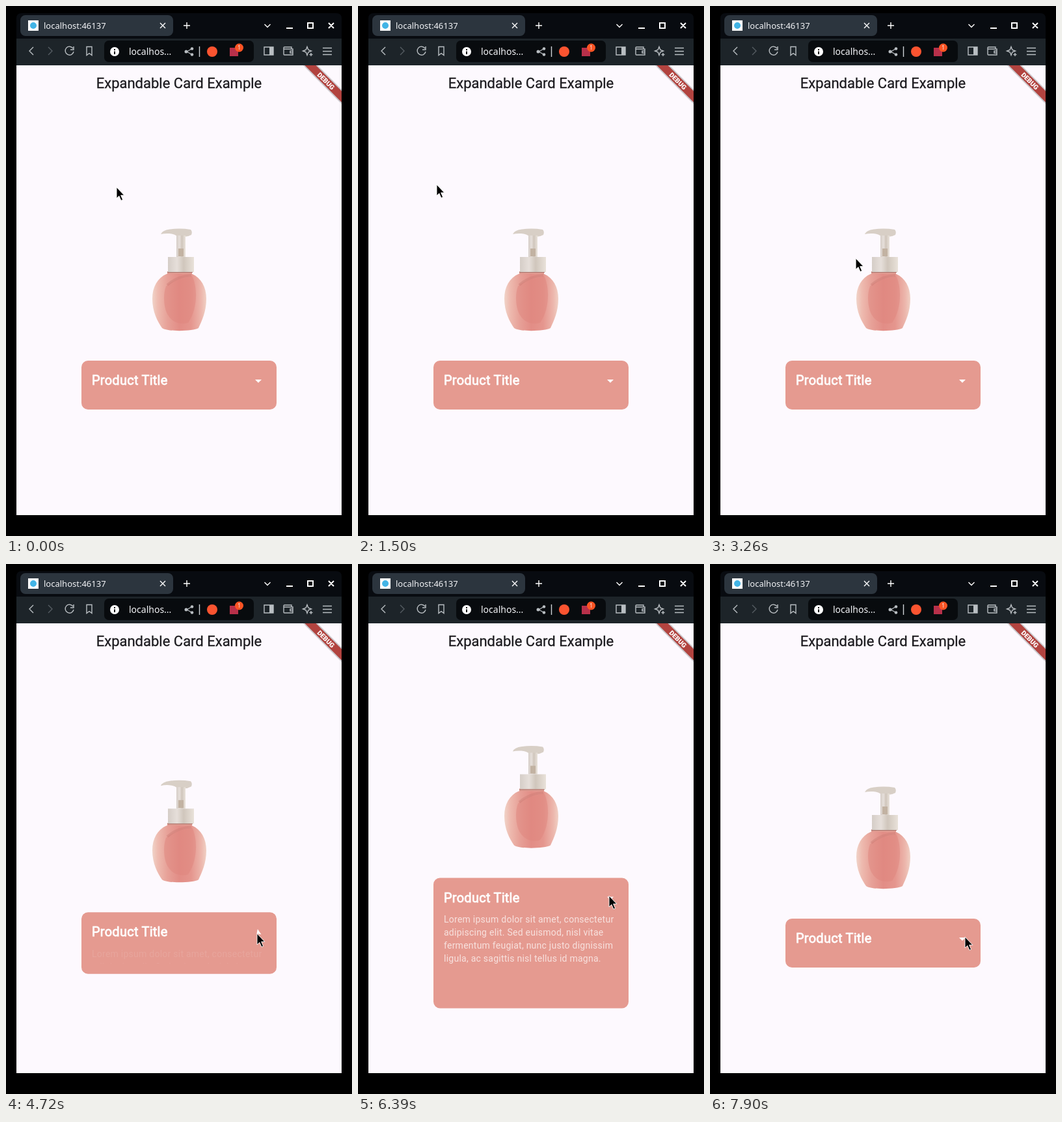
An HTML page that plays this animation: 532x813 px, repeating every 8 s.

```html
<!DOCTYPE html>
<html lang="en">
<head>
<meta charset="utf-8">
<title>Expandable Card Example</title>
<style>
  html, body { margin: 0; width: 100%; height: 100%; overflow: hidden; background: #000; }
  svg { display: block; width: 100%; height: 100%; }
  text { font-family: Roboto, sans-serif; white-space: pre; }
  .ui { font-family: "Noto Sans", sans-serif; fill: #f4f5f8; }
  .icon { fill: none; stroke: #b9bec2; stroke-width: 1.4; }
  .bright { stroke: #fff; stroke-width: 2; }
  .body { font-size: 14px; letter-spacing: .25px; fill: #fff; }
  .name { font-size: 20px; letter-spacing: .25px; fill: #fff; stroke: #fff; stroke-width: .8; }
</style>
</head>
<body>
<svg viewBox="0 0 532 813">
  <defs>
    <linearGradient id="glass">
      <stop stop-color="#f0d3c8"/><stop offset=".1" stop-color="#eebbb0"/>
      <stop offset=".28" stop-color="#e7a198"/><stop offset=".5" stop-color="#e28d86"/>
      <stop offset=".72" stop-color="#e5968e"/><stop offset=".9" stop-color="#ecb5ab"/>
      <stop offset="1" stop-color="#f0d0c4"/>
    </linearGradient>
    <linearGradient id="metal">
      <stop stop-color="#d5cdc7"/><stop offset=".35" stop-color="#e6dfda"/>
      <stop offset=".6" stop-color="#d0c6bc"/><stop offset="1" stop-color="#e9e2da"/>
    </linearGradient>
    <filter id="soft"><feGaussianBlur stdDeviation="3"/></filter>
    <filter id="edge"><feGaussianBlur stdDeviation=".6"/></filter>
    <clipPath id="page"><path d="M16 91h500v690H16z"/></clipPath>
    <clipPath id="room"><rect id="roomBox" x="116" width="300"/></clipPath>
  </defs>

  <!-- window -->
  <rect width="532" height="813"/>
  <path d="M16 91V19q0-8 8-8h484q8 0 8 8v72z" fill="#080b10"/>
  <path d="M16 50h500v41H16z" fill="#1d2429"/>
  <rect x="22" y="14" width="235" height="32" rx="8" fill="#2c353e"/>
  <path d="M34 22h16v16H34z" fill="#fff"/>
  <circle cx="42" cy="30" r="5" fill="#42b4e6"/>
  <text class="ui" x="58" y="35" font-size="13">localhost:46137</text>
  <g class="icon bright">
    <path d="M237 26l8 8m0-8l-8 8M273 30h10m-5-5v10" stroke-width="1.4"/>
    <path d="M397.500 28l4.500 4.500 4.500-4.500" stroke-width="1.4"/>
    <path d="M431 34h10M464 26h8v8h-8zM496 26l8 8m0-8l-8 8"/>
  </g>

  <!-- toolbar -->
  <rect x="151" y="53" width="230" height="33" rx="7" fill="#080b0e"/>
  <g class="icon">
    <path d="M42 63l-6 6 6 6M103 65a6.500 6.500 0 1 0 1 5M104 62v5h-5M124 62.500h8v13l-4-3-4 3z"/>
    <path d="M65 63l6 6-6 6" stroke="#555c62"/>
    <path d="M278 70l7-4m-7 4l7 4"/>
    <g fill="#b9bec2" stroke="none">
      <circle cx="277" cy="70" r="2.500"/><circle cx="286" cy="65.500" r="2.300"/><circle cx="286" cy="74.500" r="2.300"/>
      <path d="M405 63h6v12h-6z"/>
    </g>
    <path d="M297.500 62v16" stroke="#d0d4d8"/>
    <path d="M397 63h14v12h-14z"/>
    <path d="M427 66v-2q0-1 1-1h11v3m-12 0h14v9h-13q-1 0-1-1zM441 69h-4v3h4"/>
    <path d="M463 62.500l1.800 4.700 4.700 1.800-4.700 1.800-1.800 4.700-1.800-4.700-4.700-1.800 4.700-1.800zM469 72v5m-2.500-2.500h5"/>
    <path d="M487 64.500h14m-14 5h14m-14 5h14"/>
  </g>
  <circle cx="167" cy="70" r="7" fill="#fff"/>
  <path d="M167 66v2m0 1.500v4.500" stroke="#111" stroke-width="2"/>
  <text class="ui" x="189" y="75" font-size="14">localhos...</text>
  <circle cx="317" cy="70" r="8" fill="#fb5430"/>
  <path d="M344 64h13v13h-13z" fill="#b8304a"/>
  <circle cx="358.500" cy="64" r="6.500" fill="#fb5424"/>
  <text class="ui" x="358.500" y="67" font-size="8" text-anchor="middle">1</text>

  <!-- page -->
  <path d="M16 91h500v690H16z" fill="#fdf9fe"/>
  <text x="266" y="126" font-size="22" text-anchor="middle" fill="#1c1b1f" stroke="#1c1b1f" stroke-width=".3">Expandable Card Example</text>
  <g clip-path="url(#page)">
    <g transform="translate(516 91) rotate(45)">
      <path d="M-44 28h88v12h-88z" opacity=".5" filter="url(#soft)"/>
      <path d="M-40 28h80v12h-80z" fill="#b2433f"/>
      <text y="37.700" font-size="10.200" font-weight="900" text-anchor="middle" fill="#fff">DEBUG</text>
    </g>
  </g>

  <!-- everything here rises while the card grows -->
  <g id="product">
    <g filter="url(#edge)">
      <path d="M238 350q2-6 14-7.500 16-2 32 .5 3 3 1 8-5 3-11 3h-10q-4-4-13-5-7-.5-13 1z" fill="#d8cfc6"/>
      <path d="M262 352h14v33h-14z" fill="url(#metal)"/>
      <path d="M265 372h8v12h-8z" fill="#c2b2a2"/>
      <path d="M248 407h38v7h-38z" fill="#df9a90"/>
      <path d="M247 411h39c14 6 22 20 22 38 0 20-7 34-12 45-8 5-48 6-56 0-7-10-15-25-15-45 0-18 8-32 22-38z" fill="url(#glass)"/>
      <path d="M246 430c8-10 30-12 40-16 8 14 10 50-6 72-14 4-28-2-34-18-4-12-4-28 0-38z" fill="#e0857f" opacity=".5"/>
      <path d="M248 428q14-13 37-15" fill="none" stroke="#c97870" stroke-width="4" opacity=".4"/>
      <path d="M249 385h40v23h-40z" fill="url(#metal)"/>
      <path d="M248 408.500h39" stroke="#a8746c"/>
    </g>
    <rect id="card" x="116" y="544" width="300" rx="10" fill="#e59a90"/>
    <text class="name" x="132" y="581">Product Title</text>
    <path id="arrow" d="M-5-2h10l-5 5z" fill="#fff"/>
    <g id="copy" class="body" clip-path="url(#room)">
      <text x="132" y="612.500">Lorem ipsum dolor sit amet, consectetur</text>
      <text x="132" y="632.500">adipiscing elit. Sed euismod, nisl vitae</text>
      <text x="132" y="652.500">fermentum feugiat, nunc justo dignissim</text>
      <text x="132" y="672.500">ligula, ac sagittis nisl tellus id magna.</text>
    </g>
  </g>
  <path id="cursor" d="M0 0v17l3.900-3.600 3 7 2.700-1.200-3-6.800h5.200z" stroke="#fff" stroke-width=".9"/>
</svg>
<script>
  const LOOP = 8000, CLOSED = 75, OPEN = 200, TURN = 730;
  const $ = id => document.getElementById(id);
  const set = (id, attrs) => {
    for (const k in attrs) $(id).setAttribute(k, attrs[k]);
  };
  const ramp = (t, from, to) => Math.min(1, Math.max(0, (t - from) / (to - from)));

  // cubic-bezier(.25, .1, .25, 1), solved by bisection
  function ease(x) {
    const bezier = (u, a, b) => 3 * a * u * (1 - u) ** 2 + 3 * b * u * u * (1 - u) + u ** 3;
    let low = 0, high = 1;
    for (let i = 0; i < 20; i++) {
      const mid = (low + high) / 2;
      if (bezier(mid, .25, .25) < x) low = mid; else high = mid;
    }
    return x <= 0 ? 0 : x >= 1 ? 1 : bezier(low, .1, 1);
  }

  // time, x, y
  const path = [
    [80, 170, 278], [830, 146, 276], [930, 146, 276], [1500, 121, 274],
    [1770, 121, 274], [2410, 163, 320], [2600, 163, 320], [3260, 224, 387],
    [3410, 240, 403], [4120, 360, 538], [4220, 360, 538], [4410, 386, 567],
    [5480, 386, 567], [6000, 387, 530], [6170, 387, 530], [6390, 386, 509],
    [7750, 386, 509], [7900, 392, 572]
  ];

  function pointer(t) {
    const i = path.findIndex(p => p[0] > t);
    if (i < 1) return (i ? path[path.length - 1] : path[0]).slice(1);
    const a = path[i - 1], b = path[i], k = ramp(t, a[0], b[0]);
    return [a[1] + (b[1] - a[1]) * k, a[2] + (b[2] - a[2]) * k];
  }

  function draw(t) {
    const step = start => ease(ramp(t, start, start + TURN));
    const open = step(4622) - step(6915);
    const grow = (OPEN - CLOSED) * open, height = CLOSED + grow;
    set('product', { transform: `translate(0 ${-grow / 2})` });
    set('card', { height });
    set('roomBox', { y: 544, height: height - 16 });
    set('copy', { opacity: .7 * open });
    set('arrow', { transform: `translate(388 575) rotate(${360 * open})` });
    set('cursor', { transform: `translate(${pointer(t)})` });
  }

  function tick(now) {
    draw(now % LOOP);
    requestAnimationFrame(tick);
  }
  draw(0);
  requestAnimationFrame(tick);
</script>
</body>
</html>
```
